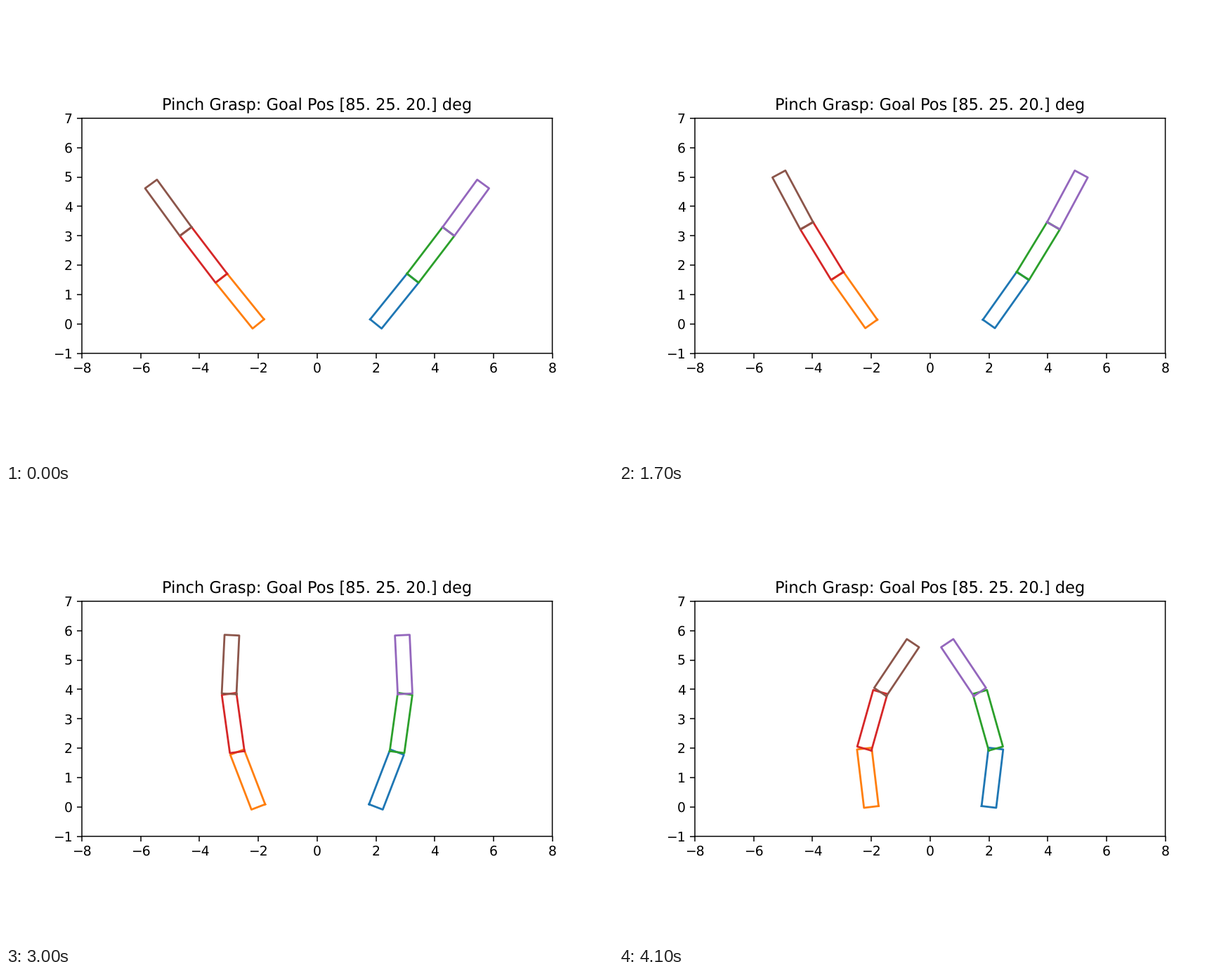
Animation of 864 by 648 pixels, one loop 4.27 s. Source, as a matplotlib script:

```python
import matplotlib.pyplot as plt
import numpy as np
from matplotlib.animation import FuncAnimation

LENGTH, WIDTH, BASE_X = 2.0, 0.5, 2.0
GOAL = np.array([85.0, 25.0, 20.0])
STEP_MS, LOOP_MS, TICK_MS = 100, 4270, 10
LAST_STEP = 41

# All joints share one progress value, scaled by each joint's sweep in degrees.
START = np.array([48.7, 0.0, 0.0])
SWEEP = np.array([38.3, 25.0, 20.0])


def progress(step):
    """Slow approach, a pause, then a steady closing speed."""
    return np.interp(step, [0, 10, 17, 24, LAST_STEP],
                     [0.0625, 0.128, 0.157, 0.325, 0.901])


def finger_outlines(step):
    """Closed outline of each link of the right finger, base first."""
    outlines = []
    start = np.array([BASE_X, 0.0])
    joints = START + progress(step) * SWEEP
    for angle in np.radians(np.cumsum(joints)):
        along = np.array([np.cos(angle), np.sin(angle)])
        side = np.array([-along[1], along[0]]) * WIDTH / 2
        end = start + LENGTH * along
        corners = [start + side, end + side, end - side, start - side]
        outlines.append(np.array(corners + corners[:1]))
        start = end
    return outlines


plt.rcParams["text.hinting"] = "none"
fig, ax = plt.subplots(figsize=(6.4, 4.8), dpi=135)
ax.set_aspect("equal")
ax.set_xlim(-8, 8)
ax.set_ylim(-1, 7)
ax.set_title(f"Pinch Grasp: Goal Pos {GOAL} deg")
for spine in ax.spines.values():
    spine.set_snap(False)

# Each link adds its right line, then its mirrored left one.
links = [(ax.plot([], [])[0], ax.plot([], [])[0]) for _ in GOAL]


def update(tick):
    step = min(tick * TICK_MS // STEP_MS, LAST_STEP)
    for (right, left), outline in zip(links, finger_outlines(step)):
        x, y = outline.T
        right.set_data(x, y)
        left.set_data(-x, y)
    return [line for pair in links for line in pair]


anim = FuncAnimation(fig, update, init_func=lambda: update(0),
                     frames=LOOP_MS // TICK_MS, interval=TICK_MS,
                     repeat=True, repeat_delay=0)
plt.show()
```
